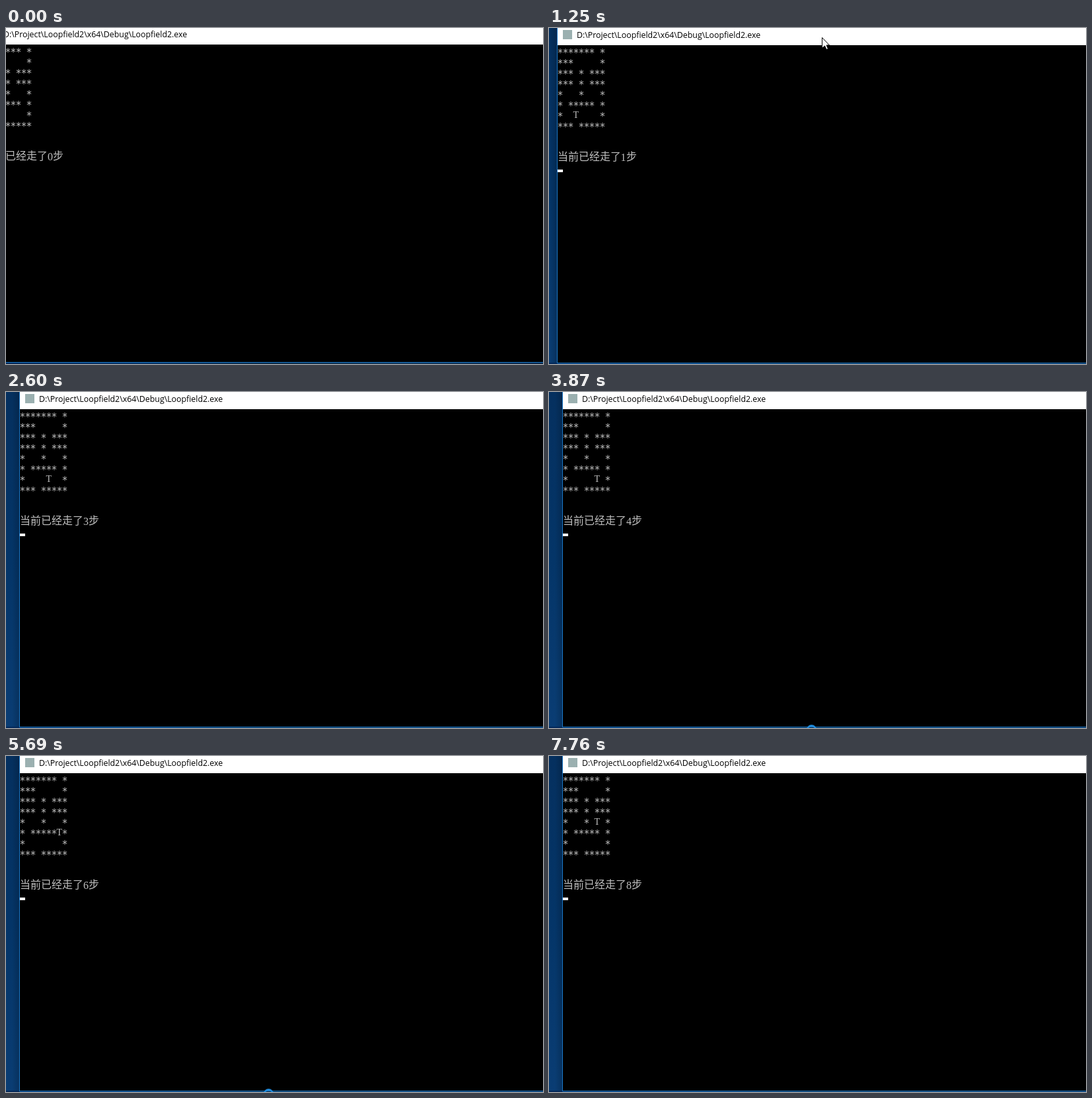
These frames come from a looping animation (813 px wide and 508 px high, 8 s). An HTML page with a canvas:

```html
<!DOCTYPE html>
<html lang="zh">
<head>
<meta charset="utf-8">
<style>
  html, body { margin: 0; width: 100%; height: 100%; overflow: hidden; background: #000; }
  canvas { display: block; }
</style>
</head>
<body>
<canvas id="stage" width="813" height="508"></canvas>
<script>
const ctx = document.getElementById('stage').getContext('2d');
const W = 813, H = 508, LOOP = 8000;
const TITLE = 'D:\\Project\\Loopfield2\\x64\\Debug\\Loopfield2.exe';
const MAZE = [
  '******* *',
  '***     *',
  '*** * ***',
  '*** * ***',
  '*   *   *',
  '* ***** *',
  '*       *',
  '*** *****'
];
const ENTRANCE = { row: 7, col: 3 };
const ROUTE = 'URRRRUUL';

// The screen refreshes in ticks; the first move happens on tick 0.
const FIRST_MOVE = 515, TICK = 139, MOVE_TICKS = 7.45;
const GRAB = 4, RELEASE = 8, RING_ON = 24, CLEAR = 29, FOCUS = 30, RING_OFF = 45;

const stepsAt = tick => Math.max(0, Math.ceil((tick + .75) / MOVE_TICKS));
const moveTick = step => Math.floor((step - 1) * MOVE_TICKS + .25);

// Approaches a value exponentially, n ticks after the start.
const settle = (from, to, n, decay) => to + (from - to) * decay ** Math.max(0, n);

function playerAt(steps) {
  let { row, col } = ENTRANCE;
  for (const move of ROUTE.slice(0, steps)) {
    if (move === 'U') row--;
    else col += move === 'R' ? 1 : -1;
  }
  return { row, col };
}

// Rise to the title bar, drag the window, then swing down and off the stage.
function pointerAt(tick) {
  if (tick <= GRAB) {
    const u = (tick + 1) / (GRAB + 1);
    return [345 + 26 * u ** 1.5, 13 + 93 * (1 - u) ** 4.25];
  }
  if (tick <= RELEASE) return [settle(371, 419, tick - GRAB, .13), 14];
  const n = tick - RELEASE;
  return [419 - 39.3 * n + 9.67 * n * n, 14 + 36.6 * n ** 2.33];
}

function rect(color, x, y, w, h) {
  ctx.fillStyle = color;
  ctx.fillRect(x, y, w, h);
}

function gradient(x0, x1, y1, ...colors) {
  const g = ctx.createLinearGradient(x0, 0, x1, y1);
  colors.forEach((c, i) => g.addColorStop(i / (colors.length - 1), c));
  return g;
}

// Draws a glyph with its ink centred on the given point.
function glyph(char, font, x, y) {
  ctx.font = font;
  const m = ctx.measureText(char);
  ctx.fillText(char,
    x + (m.actualBoundingBoxLeft - m.actualBoundingBoxRight) / 2,
    y + (m.actualBoundingBoxAscent - m.actualBoundingBoxDescent) / 2);
}

const desktopSide = gradient(0, 0, H, '#05305f', '#043568', '#0a3d74');
const desktopBottom = gradient(0, W, 0, '#03285a', '#063468', '#0a2b48', '#12395e', '#08264a');

function drawWindow(x, y) {
  rect(desktopSide, 0, 0, W, H);
  rect(gradient(x - 12, x, 0, 'rgba(0,0,0,0)', 'rgba(0,0,0,.2)'), x - 12, 0, 12, H);
  rect(desktopBottom, 0, 506 + y, W, 3);
  rect('#1a78c8', x - 1, 0, W + 40, 507 + y);
  rect('#000', x, 0, W + 40, 506 + y);
  rect('#fff', x, 0, W + 40, 26 + y);
  rect('#9bb0b0', x + 8, 3 + y, 14, 14);
  ctx.fillStyle = '#000';
  ctx.font = '12.35px "Open Sans", sans-serif';
  ctx.fillText(TITLE, x + 29, 15 + y);
}

function drawConsole(x, y, steps) {
  const { row, col } = playerAt(steps);
  const cell = (char, font, r, c) => glyph(char, font, x + c * 8 + 4, y + 35 + r * 16);
  ctx.fillStyle = '#c0c0c0';
  MAZE.forEach((line, r) => [...line].forEach((char, c) => {
    if (char === '*') cell(char, '15px "DejaVu Sans Mono", monospace', r, c);
  }));
  cell('T', '14px "Liberation Serif", serif', row, col);
  cell(String(steps), '16px "Liberation Serif", serif', 10, 12.9 - .9);
  ctx.font = '300 16px "Noto Sans CJK SC", "Noto Sans CJK", sans-serif';
  ctx.fillText('当前已经走了', x, y + 200);
  ctx.fillText('步', x + 104, y + 200);
}

function drawPointer(x, y) {
  ctx.save();
  ctx.translate(x, y);
  const arrow = new Path2D('M.5 .5V16.5L4.5 13L7 18.5L9.5 17.5L7.1 12H11.5Z');
  ctx.fillStyle = '#fff';
  ctx.fill(arrow);
  ctx.strokeStyle = '#000';
  ctx.lineWidth = 1;
  ctx.stroke(arrow);
  ctx.restore();
}

function drawBusyRing() {
  ctx.beginPath();
  ctx.arc(397.5, 510.5, 6, 0, Math.PI * 2);
  ctx.strokeStyle = '#1f88d8';
  ctx.lineWidth = 3;
  ctx.stroke();
}

function render(t) {
  const tick = Math.floor((t - FIRST_MOVE) / TICK);
  const steps = stepsAt(tick);
  const x = Math.round(settle(-33, 21, tick - GRAB, .15));
  const y = Math.round(settle(-1, 0, tick - GRAB, .15));
  const caretOn = tick < FOCUS || tick - moveTick(steps) < 4;

  drawWindow(x, y);
  if (tick !== CLEAR) drawConsole(x, y, steps);
  if (caretOn) rect('#fff', x, y + 214, 8, 4);
  if (tick >= RING_ON && tick < RING_OFF) drawBusyRing();
  if (tick >= -1) drawPointer(...pointerAt(tick).map(Math.round));
}

const start = performance.now();
function frame() {
  render((performance.now() - start) % LOOP);
  requestAnimationFrame(frame);
}
frame();
</script>
</body>
</html>
```
